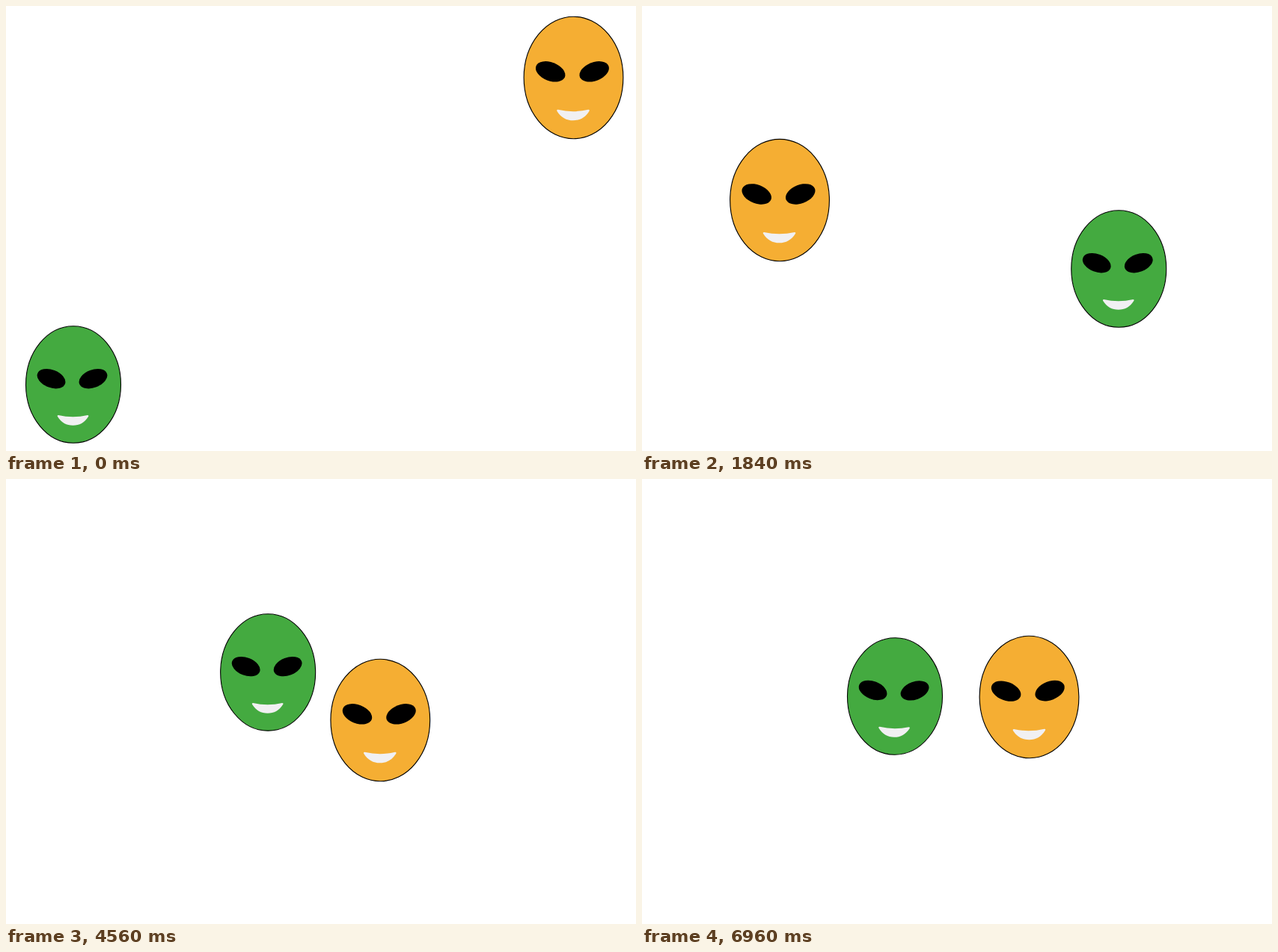
An HTML page for the animation above (7000 ms loop, 842 px wide and 596 px high).

```html
<!DOCTYPE html>
<html lang="en">
<head>
<meta charset="utf-8">
<title>Two masks</title>
<style>
  html, body { margin: 0; width: 100%; height: 100%; overflow: hidden; background: #fff; }
  svg { display: block; }
</style>
</head>
<body>
<svg width="842" height="596" viewBox="0 0 842 596">
  <defs>
    <ellipse id="eye" rx="19.7" ry="11.9" fill="#000"/>
    <g id="face">
      <ellipse rx="63.5" ry="78.2" stroke="#000" stroke-width="1.1"/>
      <use href="#eye" transform="translate(-29.5 -7.8) rotate(21)"/>
      <use href="#eye" transform="translate(26.5 -7.8) rotate(-21)"/>
      <path fill="#f1f0f2" d="M-20 41Q-.5 45.500 19 41Q21 41 20 43C15 51 8 54.800-.5 54.800S-16 51-21 43Q-22 41-20 41Z"/>
    </g>
  </defs>
  <use id="green" href="#face" fill="#44aa40"/>
  <use id="orange" href="#face" fill="#f5ae33"/>
</svg>
<script>
const LOOP = 7000, STEP = 40;
const LEG = 1000;              // time per curve; the last one runs at half pace
const ARRIVE = 5000, TILT = 4.7;

function curve(d) {
  const path = document.createElementNS('http://www.w3.org/2000/svg', 'path');
  path.setAttribute('d', d);
  return path;
}

// A route of Bezier curves, each travelled at constant speed.
function mask(id, side, scale, route) {
  const parts = route.split('C');
  const joins = parts.map((_, i) => curve(parts.slice(0, i + 1).join('C')).getTotalLength());
  return { node: document.getElementById(id), side, scale, path: curve(route), joins };
}

const masks = [
  mask('green', -1, 1, 'M90 507C200 509 315 514 420 478C505 442 622 399 664 312' +
    'C634 222 511 193 425 172C365 183 359 243 338 291'),
  mask('orange', 1, 1.045, 'M758.500 96C640 92 517 79 405 115.500C318 155 198 221 154.500 301' +
    'C194 378 334 395 408 399.500C474 392 491 336 517.500 292')
];

function draw(now) {
  const t = Math.floor(now % LOOP / STEP) * STEP;
  const travel = t < 3 * LEG ? t / LEG : Math.min(4, 3 + (t - 3 * LEG) / (2 * LEG));
  const leg = Math.min(3, Math.floor(travel));
  const tilt = t < ARRIVE ? 0 : TILT * Math.sin((t - ARRIVE) / (LOOP - ARRIVE) * 2 * Math.PI);
  for (const { node, side, scale, path, joins } of masks) {
    const length = joins[leg] + (joins[leg + 1] - joins[leg]) * (travel - leg);
    const { x, y } = path.getPointAtLength(length);
    node.setAttribute('transform',
      `translate(${x} ${y}) rotate(${side * tilt}) scale(${scale})`);
  }
}

let start;
function tick(now) {
  start ??= now;
  draw(now - start);
  requestAnimationFrame(tick);
}
draw(0);
requestAnimationFrame(tick);
</script>
</body>
</html>
```
